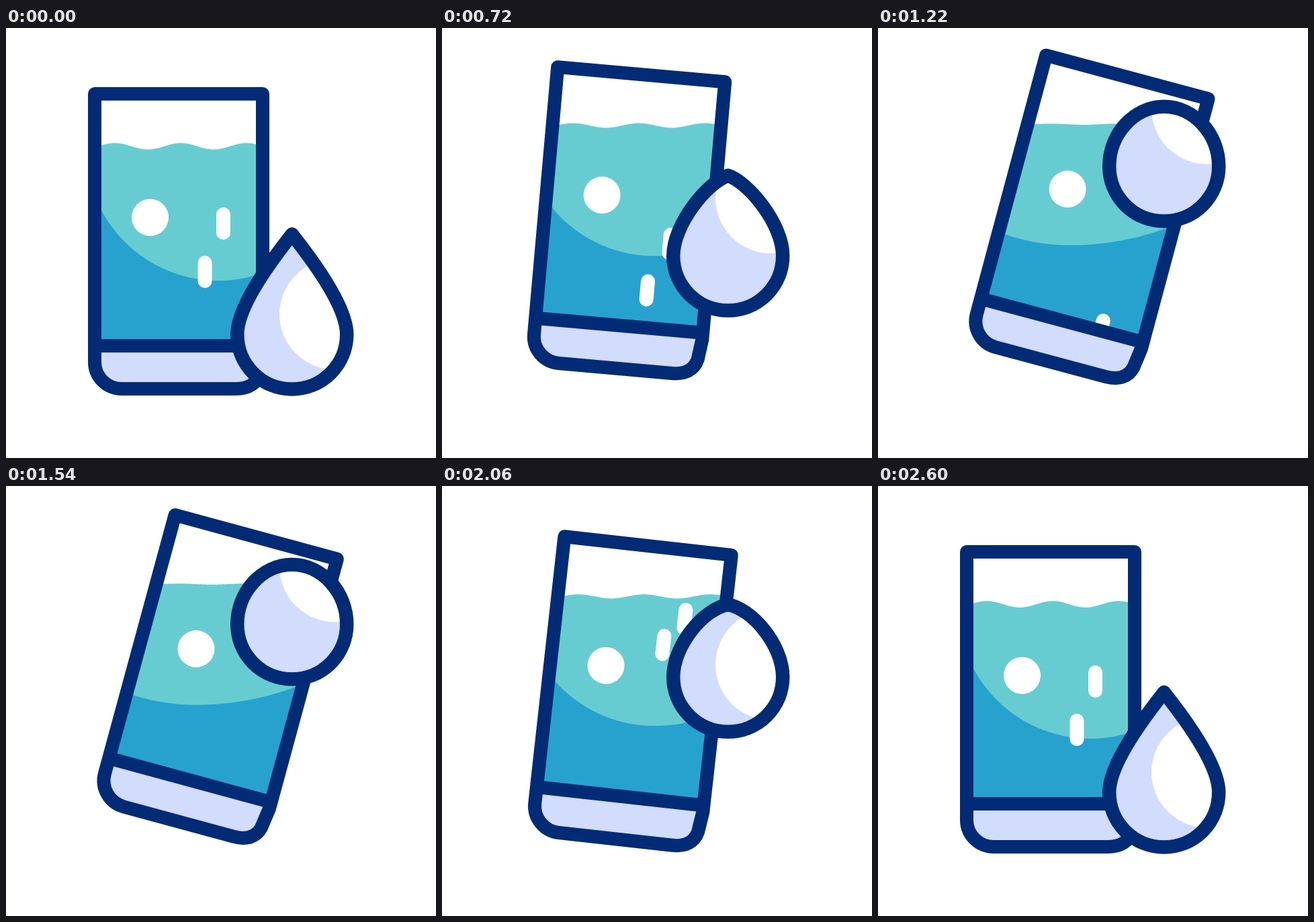
An HTML page with a canvas for the animation above (3000 ms loop, 640x640 px).

```html
<!DOCTYPE html>
<html lang="en">
<head>
<meta charset="utf-8">
<title>Glass of water</title>
<style>
  html, body { margin: 0; width: 100%; height: 100%; overflow: hidden; background: #fff; }
  canvas { display: block; width: 640px; height: 640px; }
</style>
</head>
<body>
<canvas id="stage" width="640" height="640"></canvas>
<script>
const LOOP = 3000;
const NAVY = '#032b75', TEAL = '#67ccd1', BLUE = '#27a2ce', LILAC = '#d2dcfd', WHITE = '#fff';
const PIVOT = { x: 132, y: 554 };
const TILT = 16, LIFT = 75;
const START = 326, PEAK = 1380, END = 2575;

const canvas = document.getElementById('stage');
const ctx = canvas.getContext('2d');

const span = (t, a, b) => Math.min(1, Math.max(0, (t - a) / (b - a)));
const smooth = (t, a, b) => {
  const s = span(t, a, b);
  return s * s * (3 - 2 * s);
};

const glass = new Path2D('M132 98H382V483L378 513C374 530 360 537 342 537H172A40 40 0 0 1 132 497Z');
const base = new Path2D('M132 473H382');
const inside = new Path2D('M137 103H377V473H137Z');

function pose(t) {
  const rising = t < PEAK;
  const turn = rising ? smooth(t, START, PEAK) : 1 - smooth(t, PEAK, END);
  const lift = rising ? Math.sin(span(t, START, PEAK) * Math.PI / 2) : 1 - smooth(t, PEAK, 2500);
  return { rising, turn, angle: TILT * turn * Math.PI / 180, dy: -LIFT * lift };
}

function place(p) {
  ctx.translate(PIVOT.x, PIVOT.y + p.dy);
  ctx.rotate(p.angle);
  ctx.translate(-PIVOT.x, -PIVOT.y);
}

// Fills everything below the curve y = f(x).
function fillBelow(f, color) {
  ctx.beginPath();
  ctx.moveTo(0, 640);
  for (let x = 0; x <= 640; x += 2) ctx.lineTo(x, f(x));
  ctx.lineTo(640, 640);
  ctx.fillStyle = color;
  ctx.fill();
}

function disc(x, y, r) {
  ctx.beginPath();
  ctx.arc(x, y, r, 0, 2 * Math.PI);
  ctx.fillStyle = WHITE;
  ctx.fill();
}

function pill(x, y) {
  ctx.beginPath();
  ctx.moveTo(x, y - 13.5);
  ctx.lineTo(x, y + 13.5);
  ctx.lineCap = 'round';
  ctx.lineWidth = 21;
  ctx.strokeStyle = WHITE;
  ctx.stroke();
}

function outline(path, width) {
  ctx.lineWidth = width;
  ctx.lineCap = 'butt';
  ctx.lineJoin = 'round';
  ctx.strokeStyle = NAVY;
  ctx.stroke(path);
}

function drawWater({ turn, angle, dy }) {
  const sin = Math.sin(angle), cos = Math.cos(angle);
  const crest = PIVOT.x + 105 * cos + 378 * sin + 23;
  const level = PIVOT.y + 105 * sin - 378 * cos + dy;
  const amp = 4.75 * (1 - 0.89 * turn);
  fillBelow(x => level - amp * Math.cos((x - crest) * 2 * Math.PI / 98), TEAL);

  // The bowl of light water flattens as the glass leans.
  const flat = turn ** 8;
  const bx = 316 - 50 * flat, by = 376 + dy + 22 * turn ** 1.3;
  const left = 197 + 165 * flat, right = 197 + 250 * turn ** 2;
  fillBelow(x => {
    const r = x < bx ? left : right;
    return by - r + Math.sqrt(Math.max(0, r * r - (x - bx) ** 2));
  }, BLUE);
}

// Pills sink under the base, then come back from above the rim.
function drawPills({ rising, turn }) {
  const slip = turn ** 1.1;
  for (const [x, y, drop] of [[323.5, 291, 252], [296, 363, 335]]) {
    if (rising) pill(x - 7.5 * slip, y + 193 * slip);
    else pill(x, y - drop * slip);
  }
}

function drawGlass(t) {
  const p = pose(t);

  // The clip turns with the glass while the water stays level.
  ctx.save();
  place(p);
  ctx.clip(inside);
  ctx.setTransform(1, 0, 0, 1, 0, 0);
  drawWater(p);
  place(p);
  disc(214.5, 282, 27.5);
  drawPills(p);
  ctx.restore();

  ctx.save();
  place(p);
  ctx.save();
  ctx.clip(glass);
  ctx.fillStyle = LILAC;
  ctx.fillRect(120, 473, 280, 80);
  ctx.restore();
  outline(base, 20);
  outline(glass, 20);
  ctx.restore();
}

function drawDrop(t) {
  const x = 425.7, r = 81.5;
  const dip = smooth(t, 320, 443);
  const up = smooth(t, 443, 1005);
  const fall = span(t, 1551, 2462) ** 2;
  const y = 456 + 12 * dip - 262 * up + 250 * fall;

  // The tip sinks into the body until the drop is round.
  const round = up - fall;
  const tip = y - 149 + 60 * round;
  const cx = 14 + 31 * round, cy = tip + 18 * (1 - round);
  const shine = y - 30 - 56 * smooth(t, 320, 630) + 98 * smooth(t, 1570, 2350) - 42 * smooth(t, 2280, 2600);

  const shape = new Path2D();
  shape.moveTo(x, tip);
  shape.bezierCurveTo(x + cx, cy, x + r, y - 48, x + r, y);
  shape.arc(x, y, r, 0, Math.PI);
  shape.bezierCurveTo(x - r, y - 48, x - cx, cy, x, tip);
  shape.closePath();

  ctx.fillStyle = LILAC;
  ctx.fill(shape);
  ctx.save();
  ctx.clip(shape);
  disc(489.5, shine, 82.5);
  ctx.restore();
  outline(shape, 20.5);
}

function frame() {
  const t = performance.now() % LOOP;
  ctx.fillStyle = WHITE;
  ctx.fillRect(0, 0, 640, 640);
  drawGlass(t);
  drawDrop(t);
  requestAnimationFrame(frame);
}
frame();
</script>
</body>
</html>
```
